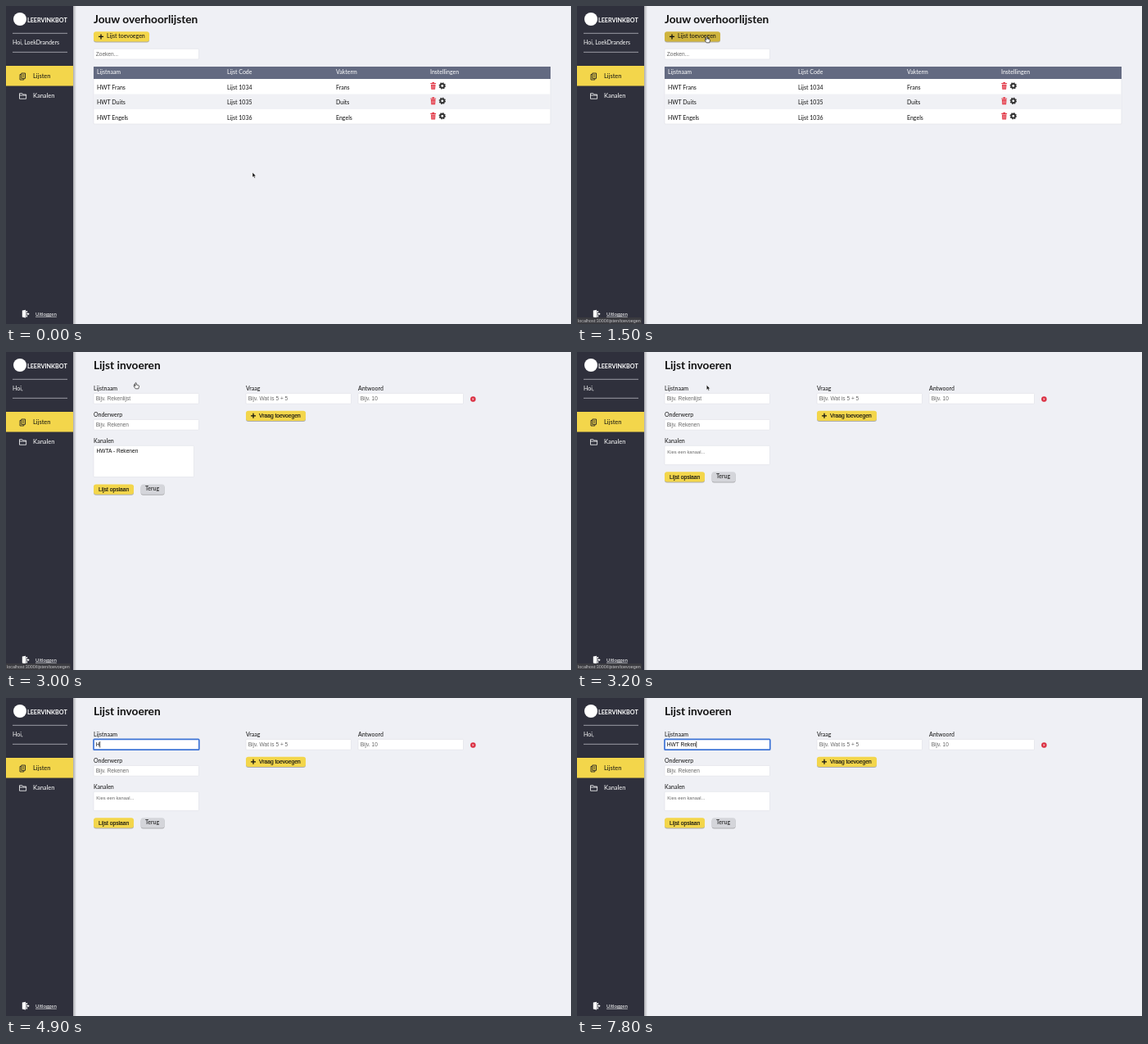
An HTML page for the animation above (8000 ms loop, 690 by 388 pixels).

```html
<!DOCTYPE html>
<html lang="nl">
<head>
<meta charset="utf-8">
<title>Overhoorlijsten</title>
<style>
  html, body { margin: 0; width: 100%; height: 100%; overflow: hidden; background: #eff0f5; }
  svg { display: block; width: 100vw; height: 100vh; }
  text { font: 7px Lato, sans-serif; fill: #111; white-space: pre; }
  .title { font-size: 13.7px; font-weight: 700; }
  .field { font: 6.6px "Liberation Sans", sans-serif; }
  .hint { fill: #686868; }
  .strong { font: 6.7px "Liberation Sans", sans-serif; stroke: #111; stroke-width: .15; }
  .light { fill: #fff; }
  .box { fill: #fff; stroke: #dedfe6; stroke-width: .6; }
</style>
</head>
<body>
<svg viewBox="0 0 690 388" preserveAspectRatio="none">
  <defs>
    <linearGradient id="edge">
      <stop stop-color="#000" stop-opacity=".28"/>
      <stop offset="1" stop-color="#000" stop-opacity="0"/>
    </linearGradient>
    <g id="plus"><path d="M-3 0H3M0-3V3" stroke="#111" stroke-width="1.3"/></g>
    <g id="trash" fill="#e23a48">
      <path d="M-3.4-3.4H3.4V-2.3H-3.4ZM-1.3-4.5H1.3V-3.4H-1.3Z"/>
      <path d="M-2.8-1.7H2.8L2.4 4.4H-2.4Z"/>
      <path d="M-1-.7V3.4M1-.7V3.4" stroke="#fff" stroke-width=".5"/>
    </g>
    <g id="gear" fill="none" stroke="#333">
      <circle r="2.4" stroke-width="1.9"/>
      <circle r="3.5" stroke-width="1.4" stroke-dasharray="1.37"/>
    </g>
  </defs>
  <rect width="690" height="388" fill="#eff0f5"/>

  <g id="listPage"></g>
  <g id="formPage"></g>

  <rect x="82" width="4" height="388" fill="url(#edge)"/>
  <rect width="82" height="388" fill="#2f303c"/>
  <circle cx="17" cy="16" r="8" fill="#fff"/>
  <text class="light" x="26" y="19.5" style="font-size:7.2px;font-weight:700">LEERVINKBOT</text>
  <path d="M8 33.3H75M8 56.3H75" stroke="#b9b9c0" stroke-width=".8"/>
  <text id="greeting" class="light" x="8" y="46.7"></text>
  <rect y="73" width="82" height="24.5" fill="#f3d64b"/>
  <g fill="none" stroke="#222" stroke-width=".9">
    <path d="M18.8 82H23.5V88.3H18.8ZM18.5 83.5H17V90H21.8V88.5M20 84H22.3M20 86H22.3"/>
  </g>
  <text x="33" y="87.6" style="font-size:7.5px">Lijsten</text>
  <path d="M16.5 106.7H19.8L20.8 108H24.6V113.2H16.5ZM16.5 109H24.6" fill="none" stroke="#fff" stroke-width=".8"/>
  <text class="light" x="33" y="112.1" style="font-size:7.5px">Kanalen</text>
  <path d="M19.8 371.6 24 370.8V380.4L19.8 379.5ZM24.5 372H26V373.8H25.2V377.6H26V379.4H24.5ZM25.4 375.1H26.7V373.9L28.6 375.7 26.7 377.5V376.3H25.4Z" fill="#fff"/>
  <text class="light" x="36" y="377.8" style="font-size:6.1px;text-decoration:underline">Uitloggen</text>

  <g id="status">
    <path d="M0 380H77Q79 380 79 382V388H0Z" fill="#3b3b40"/>
    <text x="1" y="386" style="font:5.4px 'Liberation Sans',sans-serif;fill:#c4c4c6">localhost:3000/lijsten/toevoegen</text>
  </g>

  <g id="arrow"><path d="M0 0V6L1.4 4.8 2.3 6.9 3.4 6.4 2.5 4.4H4.3Z" fill="#111" stroke="#fff" stroke-width=".5"/></g>
  <g id="hand"><path d="M-.7 4.4V.6Q0-.4.7.6V2.7L3.4 3.3Q4.1 3.6 4 4.5L3.3 7.5H-.3L-2.3 4.7Q-2-.1-.7 4.4Z" fill="#fff" stroke="#222" stroke-width=".7"/></g>
  <g id="beam"><path d="M-1.5-3.2Q0-3.2 0-2.4Q0-3.2 1.5-3.2M0-2.6V2.6M-1.5 3.2Q0 3.2 0 2.4Q0 3.2 1.5 3.2" fill="none" stroke="#222" stroke-width=".8"/></g>
</svg>
<script>
const $ = id => document.getElementById(id);
const text = (x, y, str, cls = '') => `<text x="${x}" y="${y}" class="${cls}">${str}</text>`;
const box = (x, y, w, h) => `<rect class="box" x="${x}" y="${y}" width="${w}" height="${h}" rx="1"/>`;
const input = (x, y, hint) => box(x, y, 128.5, 12.8) + text(x + 2.7, y + 8.7, hint, 'field hint');
const use = (id, x, y) => `<use href="#${id}" x="${x}" y="${y}"/>`;
const button = (x, y, w, color = '#f3d64b', id = '') =>
  `<rect x="${x}" y="${y + 1}" width="${w}" height="12.3" rx="3" fill="#777" opacity=".55"/>
   <rect id="${id}" x="${x}" y="${y}" width="${w}" height="12.3" rx="3" fill="${color}"/>`;

const columns = [111, 270, 403, 518];
const cells = (values, y, cls) => values.map((v, i) => text(columns[i], y, v, cls)).join('');
const lists = [['HWT Frans', 'Lijst 1034', 'Frans'],
               ['HWT Duits', 'Lijst 1035', 'Duits'],
               ['HWT Engels', 'Lijst 1036', 'Engels']];

$('listPage').innerHTML =
  text(107, 21, 'Jouw overhoorlijsten', 'title') +
  button(107, 31.2, 68, '#f3d64b', 'addButton') + use('plus', 116, 37.4) +
  text(123, 39.4, 'Lijst toevoegen') +
  input(107, 52.2, 'Zoeken...') +
  box(107, 74, 558, 70) +
  '<rect x="107" y="74" width="558" height="15" fill="#636a81"/>' +
  '<rect x="107" y="107.5" width="558" height="18.4" fill="#f0f1f5"/>' +
  cells(['Lijstnaam', 'Lijst Code', 'Vakterm', 'Instellingen'], 83.3, 'light') +
  lists.map((row, i) => {
    const y = 101.7 + i * 18.4;
    return cells(row, y) + use('trash', 521.7, y - 4.3) + use('gear', 532.8, y - 4.3);
  }).join('');

$('formPage').innerHTML =
  text(107, 21, 'Lijst invoeren', 'title') +
  text(107, 46.6, 'Lijstnaam') + input(107, 50.4, '') +
  '<rect id="focus" x="107" y="50.4" width="128.8" height="12.8" rx="1" fill="#fff" stroke="#3e74d6" stroke-width="1.7"/>' +
  text(109.7, 59.1, 'Bijv. Rekenlijst', 'field hint nameHint') +
  '<text id="typed" class="field" x="109.7" y="59.1"></text>' +
  '<rect id="caret" y="53" width=".7" height="7.6" fill="#111"/>' +
  text(107, 78.6, 'Onderwerp') + input(107, 82.4, 'Bijv. Rekenen') +
  text(107, 110.6, 'Kanalen') +
  `<g id="openSelect">${box(107, 114.3, 122.5, 38.3)}${text(110.5, 123.2, 'HWTA - Rekenen', 'field')}</g>` +
  `<g id="closedSelect">${box(107, 114.3, 128.5, 23.3)}
   <text class="field hint" x="110.3" y="124.4" style="font-size:5.8px">Kies een kanaal...</text></g>` +
  `<g id="actions">${button(107, 146.3, 49)}${text(113, 154.8, 'Lijst opslaan', 'strong')}
   ${button(164.6, 146.3, 29, '#d4d5da')}${text(170, 154.3, 'Terug')}</g>` +
  text(293, 46.6, 'Vraag') + input(293, 50.4, 'Bijv. Wat is 5 + 5') +
  text(430, 46.6, 'Antwoord') + input(430, 50.4, 'Bijv. 10') +
  '<circle cx="570.4" cy="57.5" r="3.2" fill="#d9263a"/>' +
  '<path d="M569.2 56.3 571.6 58.7M571.6 56.3 569.2 58.7" stroke="#fff" stroke-width=".8"/>' +
  button(293, 71.7, 73) + use('plus', 302, 77.8) + text(309, 80.2, 'Vraag toevoegen', 'strong');

const nameHint = document.querySelector('.nameHint');
const show = (el, visible) => { el.style.display = visible ? '' : 'none'; };

// Pointer stops: time, x, y
const path = [[0, 301, 203], [500, 180, 49], [700, 180, 49], [1000, 161, 38],
              [1500, 158.5, 37.3], [3000, 158.5, 37.3], [3800, 157, 56.5], [8000, 157, 56.5]];
const keyTimes = [4900, 5200, 5300, 6000, 6400, 7300, 7500, 7700, 7800];
const word = 'HWT Reken';

function pointerAt(t) {
  const i = path.findIndex(p => p[0] > t);
  const [t0, x0, y0] = path[i - 1], [t1, x1, y1] = path[i];
  const u = (t - t0) / (t1 - t0), k = u * u * (3 - 2 * u);
  return [x0 + (x1 - x0) * k, y0 + (y1 - y0) * k];
}

function draw(t) {
  const onForm = t >= 3000;
  show($('listPage'), !onForm);
  show($('formPage'), onForm);
  $('greeting').textContent = onForm ? 'Hoi,' : 'Hoi, LoekDranders';
  show($('status'), t >= 1200 && t < 3400);

  const dark = Math.min(1, Math.max(0, (t - 1000) / 300));
  const mix = (a, b) => Math.round(a + (b - a) * dark);
  $('addButton').setAttribute('fill', `rgb(${mix(243, 207)},${mix(214, 180)},${mix(75, 62)})`);

  const expanded = t < 3100;
  show($('openSelect'), expanded);
  show($('closedSelect'), !expanded);
  $('actions').setAttribute('transform', `translate(0 ${expanded ? 15.2 : 0})`);

  const count = keyTimes.filter(k => k <= t).length;
  $('typed').textContent = word.slice(0, count);
  show(nameHint, count === 0);
  show($('focus'), t >= 3900);
  const lastKey = count ? keyTimes[count - 1] : 3900;
  show($('caret'), t >= 3900 && (t - lastKey) % 1000 < 500);
  $('caret').setAttribute('x', 109.7 + (count ? $('typed').getComputedTextLength() : 0));

  const [x, y] = pointerAt(t);
  const shape = t >= 4900 ? '' : onForm && y > 50 ? 'beam'
    : t >= 900 && t < 3200 ? 'hand' : 'arrow';
  for (const id of ['arrow', 'hand', 'beam']) {
    show($(id), id === shape);
    $(id).setAttribute('transform', `translate(${x} ${y})`);
  }
}

const start = performance.now();
function tick() {
  const t = (performance.now() - start) % 8000;
  draw(Math.floor(t / 100) * 100);
  requestAnimationFrame(tick);
}
tick();
</script>
</body>
</html>
```
